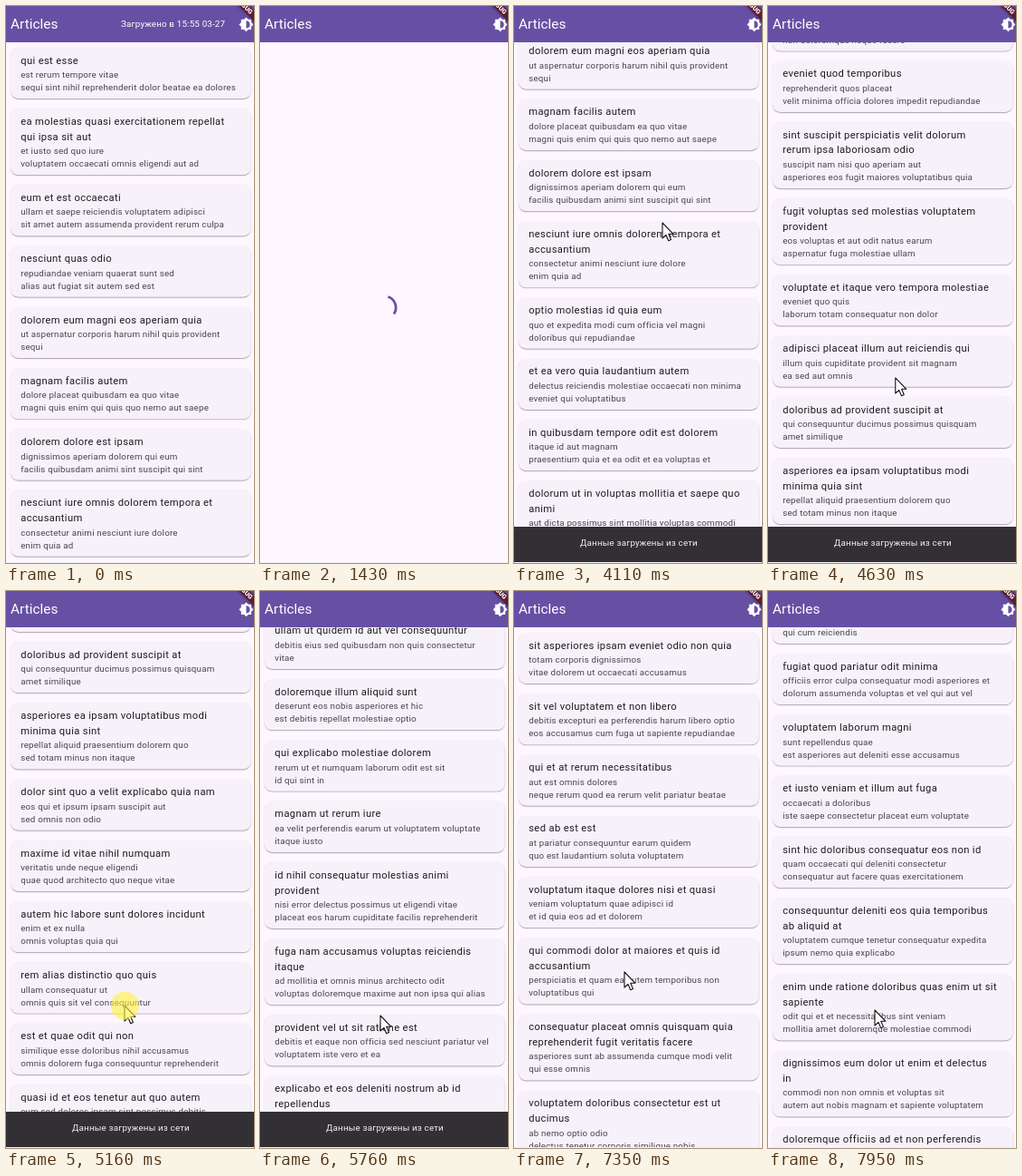
An HTML page for the animation above (8 s loop, 274x614 px).

```html
<!DOCTYPE html>
<html lang="en">
<head>
<meta charset="utf-8">
<title>Articles</title>
<style>
  :root { --u: .701px; }
  html, body { margin: 0; width: 100%; height: 100%; overflow: hidden; background: #fef7ff; }
  #stage { position: relative; width: 274px; height: 614px; overflow: hidden; background: #fef7ff;
    font-family: Roboto, "Noto Sans", sans-serif; white-space: nowrap; }
  #stage > * { position: absolute; }
  /* Whole-pixel layout, scaled down as one piece so that rounding does not add up. */
  #list { left: 5px; top: 45.6px; width: 379px; transform-origin: 0 0; }
  .card { box-sizing: border-box; padding: 8px 16px; margin-bottom: 16px; border-radius: 12px;
    background: #f7f2fa;
    box-shadow: 0 2px 1px -1px rgba(0,0,0,.2), 0 1px 1px rgba(0,0,0,.14), 0 1px 3px rgba(0,0,0,.12); }
  .title { color: #1d1b20; font-size: 16px; line-height: 24px; letter-spacing: .5px; }
  .body { color: #49454f; font-size: 14px; line-height: 20px; letter-spacing: .25px; }
  #snack, #status { font-size: calc(14 * var(--u)); line-height: calc(20 * var(--u));
    letter-spacing: calc(.25 * var(--u)); }
  #bar { left: 0; top: 0; width: 274px; height: 39.5px; background: #6750a4; }
  #bar > * { position: absolute; color: #fff; }
  #name { left: 5px; top: 10px; font-size: calc(22 * var(--u)); line-height: 20px; }
  #status { left: 127px; top: 13px; }
  #icon { left: 256.5px; top: 12px; width: 16.8px; height: 16.8px; fill: #fff; }
  #ribbon { left: 222.5px; top: -3.7px; width: 80px; height: 8.4px; transform: rotate(45deg);
    background: #5e1b32; box-shadow: 0 0 4px rgba(0,0,0,.5); text-align: center;
    font-size: 7.1px; line-height: 8.4px; font-weight: 900; }
  #snack { left: 0; top: 574px; width: 274px; height: 40px; padding-top: 11px; box-sizing: border-box;
    background: #322f35; color: #f5eff7; text-align: center; text-indent: 2px; }
  #edge { left: 0; top: 613px; width: 274px; height: 1px; background: #f6f0f8; }
  #overlay { left: 0; top: 0; }
</style>
</head>
<body>
<div id="stage">
  <div id="list"></div>
  <div id="snack">Данные загружены из сети</div>
  <div id="bar">
    <span id="name">Articles</span>
    <span id="status">Загружено в 15:55 03-27</span>
    <svg id="icon" viewBox="0 0 24 24"><path d="M20 15.31L23.31 12 20 8.69V4h-4.69L12 .69 8.69 4H4v4.69L.69 12 4 15.31V20h4.69L12 23.31 15.31 20H20zM12 18V6c3.31 0 6 2.69 6 6s-2.69 6-6 6z"/></svg>
    <span id="ribbon">DEBUG</span>
  </div>
  <svg id="overlay" width="274" height="614">
    <path id="spinner" fill="none" stroke="#6750a4" stroke-width="2.8"/>
    <g id="pointer">
      <path d="M0 0V17L4 13.4 6.7 19.8 9.5 18.6 6.8 12.3H12Z" fill="#fff" stroke="#111" stroke-width="1.1" stroke-linejoin="round"/>
      <circle id="press" cx=".3" cy=".3" r="15.5" fill="#fff23c" fill-opacity=".6"/>
    </g>
  </svg>
  <div id="edge"></div>
</div>
<script>
// One article per line: title | text, with "/" marking line breaks.
const ARTICLES = `sunt aut facere repellat provident occaecati/excepturi optio reprehenderit|quia et suscipit/suscipit recusandae consequuntur expedita et cum
qui est esse|est rerum tempore vitae/sequi sint nihil reprehenderit dolor beatae ea dolores
ea molestias quasi exercitationem repellat/qui ipsa sit aut|et iusto sed quo iure/voluptatem occaecati omnis eligendi aut ad
eum et est occaecati|ullam et saepe reiciendis voluptatem adipisci/sit amet autem assumenda provident rerum culpa
nesciunt quas odio|repudiandae veniam quaerat sunt sed/alias aut fugiat sit autem sed est
dolorem eum magni eos aperiam quia|ut aspernatur corporis harum nihil quis provident/sequi
magnam facilis autem|dolore placeat quibusdam ea quo vitae/magni quis enim qui quis quo nemo aut saepe
dolorem dolore est ipsam|dignissimos aperiam dolorem qui eum/facilis quibusdam animi sint suscipit qui sint
nesciunt iure omnis dolorem tempora et/accusantium|consectetur animi nesciunt iure dolore/enim quia ad
optio molestias id quia eum|quo et expedita modi cum officia vel magni/doloribus qui repudiandae
et ea vero quia laudantium autem|delectus reiciendis molestiae occaecati non minima/eveniet qui voluptatibus
in quibusdam tempore odit est dolorem|itaque id aut magnam/praesentium quia et ea odit et ea voluptas et
dolorum ut in voluptas mollitia et saepe quo/animi|aut dicta possimus sint mollitia voluptas commodi/quo doloremque
voluptatem eligendi optio|fuga et accusamus dolorum perferendis illo voluptas/non doloremque neque facere
eveniet quod temporibus|reprehenderit quos placeat/velit minima officia dolores impedit repudiandae
sint suscipit perspiciatis velit dolorum/rerum ipsa laboriosam odio|suscipit nam nisi quo aperiam aut/asperiores eos fugit maiores voluptatibus quia
fugit voluptas sed molestias voluptatem/provident|eos voluptas et aut odit natus earum/aspernatur fuga molestiae ullam
voluptate et itaque vero tempora molestiae|eveniet quo quis/laborum totam consequatur non dolor
adipisci placeat illum aut reiciendis qui|illum quis cupiditate provident sit magnam/ea sed aut omnis
doloribus ad provident suscipit at|qui consequuntur ducimus possimus quisquam/amet similique
asperiores ea ipsam voluptatibus modi/minima quia sint|repellat aliquid praesentium dolorem quo/sed totam minus non itaque
dolor sint quo a velit explicabo quia nam|eos qui et ipsum ipsam suscipit aut/sed omnis non odio
maxime id vitae nihil numquam|veritatis unde neque eligendi/quae quod architecto quo neque vitae
autem hic labore sunt dolores incidunt|enim et ex nulla/omnis voluptas quia qui
rem alias distinctio quo quis|ullam consequatur ut/omnis quis sit vel consequuntur
est et quae odit qui non|similique esse doloribus nihil accusamus/omnis dolorem fuga consequuntur reprehenderit
quasi id et eos tenetur aut quo autem|eum sed dolores ipsam sint possimus debitis/occaecati
delectus ullam et corporis nulla voluptas/sequi|non et quaerat ex quae ad maiores/maiores recusandae totam aut blanditiis mollitia
iusto eius quod necessitatibus culpa ea|odit magnam ut saepe sed non qui/tempora atque nihil
a quo magni similique perferendis|alias dolor cumque/impedit blanditiis non eveniet odio maxime
ullam ut quidem id aut vel consequuntur|debitis eius sed quibusdam non quis consectetur/vitae
doloremque illum aliquid sunt|deserunt eos nobis asperiores et hic/est debitis repellat molestiae optio
qui explicabo molestiae dolorem|rerum ut et numquam laborum odit est sit/id qui sint in
magnam ut rerum iure|ea velit perferendis earum ut voluptatem voluptate/itaque iusto
id nihil consequatur molestias animi/provident|nisi error delectus possimus ut eligendi vitae/placeat eos harum cupiditate facilis reprehenderit
fuga nam accusamus voluptas reiciendis/itaque|ad mollitia et omnis minus architecto odit/voluptas doloremque maxime aut non ipsa qui alias
provident vel ut sit ratione est|debitis et eaque non officia sed nesciunt pariatur vel/voluptatem iste vero et ea
explicabo et eos deleniti nostrum ab id/repellendus|animi esse sit aut sit nesciunt assumenda eum/voluptas
eos dolorem iste accusantium est eaque/quam|corporis rerum ducimus vel eum accusantium/maxime aspernatur a porro possimus iste omnis
enim quo cumque|ut voluptatum aliquid illo tenetur nemo sequi quo/facilis
non est facere|molestias id nostrum/excepturi molestiae dolore omnis repellendus
commodi ullam sint et excepturi error/explicabo praesentium voluptas|odio fugit voluptatum ducimus earum autem est/incidunt voluptatem
eligendi iste nostrum consequuntur adipisci/praesentium sit beatae perferendis|similique fugit est/illum et dolorum harum et voluptate eaque quidem
optio dolor molestias sit|temporibus est consectetur dolore/et libero debitis vel velit laboriosam quia
ut numquam possimus omnis eius suscipit/laudantium iure|est natus reiciendis nihil possimus aut provident/ex et dolor
aut quo modi neque nostrum ducimus|voluptatem quisquam iste/voluptatibus natus officiis facilis dolorem
quibusdam cumque rem aut deserunt|voluptatem assumenda ut qui ut cupiditate aut/impedit veniam
ut voluptatem illum ea doloribus itaque eos|voluptates quo voluptatem facilis iure occaecati/vel assumenda rerum officia et
laborum non sunt aut ut assumenda/perspiciatis voluptas|inventore ab sint/natus fugit id nulla sequi architecto nihil quaerat
repellendus qui recusandae incidunt/voluptates tenetur qui omnis exercitationem|error suscipit maxime adipisci consequuntur/recusandae
soluta aliquam aperiam consequatur illo quis/voluptas|sunt dolores aut doloribus/dolore doloribus voluptates tempora et
qui enim et consequuntur quia animi quis/voluptate quibusdam|iusto est quibusdam fuga quas quaerat molestias/a enim ut sit accusamus enim
ut quo aut ducimus alias|minima harum praesentium eum rerum illo dolore/quasi exercitationem rerum nam
sit asperiores ipsam eveniet odio non quia|totam corporis dignissimos/vitae dolorem ut occaecati accusamus
sit vel voluptatem et non libero|debitis excepturi ea perferendis harum libero optio/eos accusamus cum fuga ut sapiente repudiandae
qui et at rerum necessitatibus|aut est omnis dolores/neque rerum quod ea rerum velit pariatur beatae
sed ab est est|at pariatur consequuntur earum quidem/quo est laudantium soluta voluptatem
voluptatum itaque dolores nisi et quasi|veniam voluptatum quae adipisci id/et id quia eos ad et dolorem
qui commodi dolor at maiores et quis id/accusantium|perspiciatis et quam ea autem temporibus non/voluptatibus qui
consequatur placeat omnis quisquam quia/reprehenderit fugit veritatis facere|asperiores sunt ab assumenda cumque modi velit/qui esse omnis
voluptatem doloribus consectetur est ut/ducimus|ab nemo optio odio/delectus tenetur corporis similique nobis
beatae enim quia vel|enim aspernatur illo distinctio quae praesentium/beatae alias amet delectus qui voluptate distinctio
voluptas blanditiis repellendus animi/ducimus error sapiente et suscipit|enim adipisci aspernatur nemo/numquam omnis facere dolorem dolor ex quis
et fugit quas eum in in aperiam quod|id velit blanditiis/eum ea voluptatem
consequatur id enim sunt et et|voluptatibus ex esse/sint explicabo est aliquid cumque adipisci fuga
repudiandae ea animi iusto|officia veritatis tenetur vero qui itaque/sint non ratione
aliquid eos sed fuga est maxime repellendus|reprehenderit id nostrum/voluptas doloremque pariatur sint et accusantium
odio quis facere architecto reiciendis optio|magnam molestiae perferendis quisquam/qui cum reiciendis
fugiat quod pariatur odit minima|officiis error culpa consequatur modi asperiores et/dolorum assumenda voluptas et vel qui aut vel
voluptatem laborum magni|sunt repellendus quae/est asperiores aut deleniti esse accusamus
et iusto veniam et illum aut fuga|occaecati a doloribus/iste saepe consectetur placeat eum voluptate
sint hic doloribus consequatur eos non id|quam occaecati qui deleniti consectetur/consequatur aut facere quas exercitationem
consequuntur deleniti eos quia temporibus/ab aliquid at|voluptatem cumque tenetur consequatur expedita/ipsum nemo quia explicabo
enim unde ratione doloribus quas enim ut sit/sapiente|odit qui et et necessitatibus sint veniam/mollitia amet doloremque molestiae commodi
dignissimos eum dolor ut enim et delectus/in|commodi non non omnis et voluptas sit/autem aut nobis magnam et sapiente voluptatem
doloremque officiis ad et non perferendis|ut animi facere/totam iusto tempore`;

const LOOP = 8000, START = 500, TICK = 66.52;   // ms; the picture updates once per tick
const LOADED = 33;                              // tick at which the list is back
const SCALE = .701;
const FIRST_VIEW = 120 * SCALE;

// [tick, scroll]
const SCROLL = [[46, 0], [47, 3], [50, 70], [52, 190], [53, 285], [54, 380.5], [57, 640], [61, 930],
  [65, 1170], [68, 1310], [69, 1356], [70, 1369.3], [71, 1406], [72, 1490], [73, 1590], [79, 2169.5],
  [83, 2400], [88, 2560], [93, 2614], [95, 2679.8], [96, 2764], [97, 2880], [99, 3230], [102, 3740],
  [106, 4280], [112, 4939.8]];
// [tick, x, y]
const POINTER = [[33, 48, 350], [35, 72, 397], [40, 118, 452], [44, 135, 470], [47, 136, 466], [50, 148, 400],
  [52, 159, 280], [54, 164, 239], [58, 154, 305], [64, 136, 445], [69, 131, 470], [70, 131, 457],
  [72, 136, 340], [73, 139, 250], [76, 138, 345], [79, 133, 468], [93, 127, 470], [95, 127, 404],
  [97, 130, 235], [103, 122, 420], [112, 118, 462]];
const PRESSES = [[47, 53], [69, 73], [93, 97]];
// [tick, drop]
const SNACK = [[32, 40], [33, 28], [34, 7], [35, 0], [94, 0], [95, 1], [96, 8], [97, 24], [98, 40]];

const $ = id => document.getElementById(id);
const lines = (text, cls) => text.split('/').map(s => `<div class="${cls}">${s}</div>`).join('');

$('list').innerHTML = ARTICLES.split('\n').map(row => {
  const [title, body] = row.split('|');
  return `<div class="card">${lines(title, 'title')}${lines(body, 'body')}</div>`;
}).join('');

// Smooth interpolation that never overshoots its keys.
function track(keys, k, col = 1) {
  const last = keys.length - 1;
  if (k <= keys[0][0]) return keys[0][col];
  if (k >= keys[last][0]) return keys[last][col];
  const i = keys.findIndex(key => key[0] > k) - 1;
  const slope = j => (keys[j + 1][col] - keys[j][col]) / (keys[j + 1][0] - keys[j][0]);
  const tangent = j => {
    if (j === 0 || j === last) return slope(Math.min(j, last - 1));
    const a = slope(j - 1), b = slope(j);
    return a * b > 0 ? 2 * a * b / (a + b) : 0;
  };
  const h = keys[i + 1][0] - keys[i][0], p = (k - keys[i][0]) / h;
  const a = keys[i][col], b = keys[i + 1][col], q = 1 - p;
  return a * q * q * (1 + 2 * p) + b * p * p * (3 - 2 * p)
    + h * p * q * (tangent(i) * q - tangent(i + 1) * p);
}

// cubic-bezier(.4, 0, .2, 1)
function ease(x) {
  x = Math.min(1, Math.max(0, x));
  let lo = 0, hi = 1, u;
  for (let i = 0; i < 24; i++) {
    u = (lo + hi) / 2;
    if (1.2 * u * (1 - u) ** 2 + .6 * u * u * (1 - u) + u ** 3 < x) lo = u; else hi = u;
  }
  return u * u * (3 - 2 * u);
}

function spinnerPath(ms) {
  const phase = ms / 1333 % 1, cx = 137.5, cy = 332.5, r = 12.6;
  const head = ease(phase * 2), tail = ease(phase * 2 - 1);
  const from = Math.PI * (-.5 + 1.5 * tail + 2 * (ms / 2222 % 1) + .5 * phase);
  const sweep = Math.max(1.5 * Math.PI * (head - tail), .03);
  const point = a => `${cx + r * Math.cos(a)} ${cy + r * Math.sin(a)}`;
  return `M${point(from)}A${r} ${r} 0 ${sweep > Math.PI ? 1 : 0} 1 ${point(from + sweep)}`;
}

const show = (el, on) => { el.style.visibility = on ? 'visible' : 'hidden'; };

function draw(t) {
  const k = Math.floor((t - START) / TICK + .1);
  const before = k < 0, loading = !before && k < LOADED;

  show($('status'), before);
  show($('list'), !loading);
  const y = before ? FIRST_VIEW : track(SCROLL, k);
  $('list').style.transform = `translateY(${-y}px) scale(${SCALE})`;

  show($('spinner'), loading);
  if (loading) $('spinner').setAttribute('d', spinnerPath(Math.min(k, 30) * TICK));

  $('snack').style.transform = `translateY(${track(SNACK, k)}px)`;

  show($('pointer'), k >= LOADED);
  $('pointer').setAttribute('transform', `translate(${track(POINTER, k, 1)} ${track(POINTER, k, 2)})`);
  show($('press'), PRESSES.some(([a, b]) => k >= a && k < b));
}

const origin = performance.now();
function frame() {
  draw((performance.now() - origin) % LOOP);
  requestAnimationFrame(frame);
}
frame();
</script>
</body>
</html>
```
